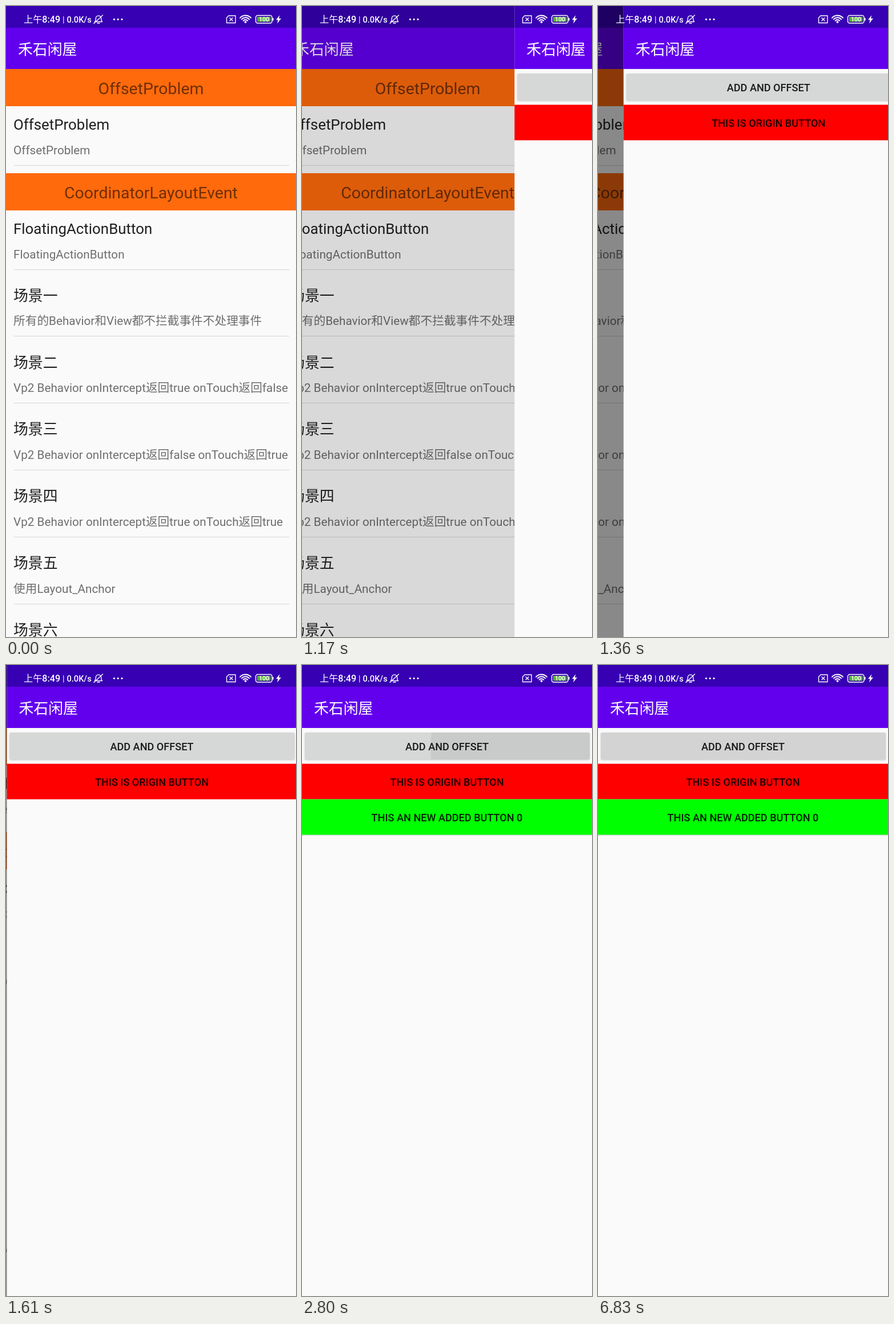
Write an HTML page with a canvas that moves like this. It is 508 px wide and 1102 px high and loops after 8000 ms.

```html
<!DOCTYPE html>
<html lang="zh-CN">
<head>
<meta charset="utf-8">
<title>List to detail</title>
<style>
html, body { margin: 0; width: 100%; height: 100%; overflow: hidden; background: #fafafa; }
canvas { display: block; width: 508px; height: 1102px; }
</style>
</head>
<body>
<canvas id="stage"></canvas>
<script>
const W = 508, H = 1102, LOOP = 8000;
const FAMILY = 'Roboto, "Noto Sans CJK SC", "Noto Sans CJK", sans-serif';
const APP = '禾石闲屋';
const INK = 'rgba(0,0,0,.88)', SOFT = 'rgba(0,0,0,.56)';
const ROW = 116.8, HEAD = 65;

const TICKS = [0, 850, 970, 1070, 1170, 1260, 1360, 1440, 1530, 1610, 1720, 1770,
  1820, 2540, 2630, 2720, 2810, 2900, 2980, 3070];

const ROWS = [
  ['FloatingActionButton', 'FloatingActionButton'],
  ['场景一', '所有的Behavior和View都不拦截事件不处理事件'],
  ['场景二', 'Vp2 Behavior onIntercept返回true onTouch返回false'],
  ['场景三', 'Vp2 Behavior onIntercept返回false onTouch返回true'],
  ['场景四', 'Vp2 Behavior onIntercept返回true onTouch返回true'],
  ['场景五', '使用Layout_Anchor'],
  ['场景六', '']
];

const canvas = document.getElementById('stage');
const dpr = window.devicePixelRatio || 1;
canvas.width = W * dpr;
canvas.height = H * dpr;
const ctx = canvas.getContext('2d');

function rect(x, y, w, h, color) {
  ctx.fillStyle = color;
  ctx.fillRect(x, y, w, h);
}

function text(str, x, y, size, color, weight = 400, align = 'left') {
  ctx.font = `${weight} ${size}px ${FAMILY}`;
  ctx.textAlign = align;
  ctx.fillStyle = color;
  ctx.fillText(str, x, y);
}

function line(points, close) {
  ctx.beginPath();
  points.forEach(([x, y], i) => i ? ctx.lineTo(x, y) : ctx.moveTo(x, y));
  if (close) ctx.closePath();
}

function disc(x, y, r, color) {
  ctx.beginPath();
  ctx.arc(x, y, r, 0, 7);
  ctx.fillStyle = color;
  ctx.fill();
}

function appBar() {
  rect(0, 0, W, 38, '#3700b3');
  rect(0, 38, W, 72, '#6200ee');
  text(APP, 21, 84.5, 25.87, '#fff');
}

function header(y, label) {
  rect(0, y, W, HEAD, '#ff6a0c');
  text(label, W / 2, y + 44, 28.45, SOFT, 400, 'center');
}

function row(y, [title, note]) {
  text(title, 13, y + 41, 25.87, INK);
  text(note, 13, y + 83.5, 20.7, SOFT);
  rect(14, Math.round(y + 102.5), 482, 1, '#d5d5d5');
}

function listPage() {
  rect(0, 0, W, H, '#fafafa');
  header(110, 'OffsetProblem');
  row(175, ['OffsetProblem', 'OffsetProblem']);
  header(292, 'CoordinatorLayoutEvent');
  ROWS.forEach((r, i) => row(357 + i * ROW, r));
  appBar();
}

function caption(str, y) {
  text(str, W / 2, y, 18.1, INK, 500, 'center');
}

function detailPage(t) {
  rect(0, 0, W, H, '#fafafa');
  ctx.save();
  ctx.shadowColor = 'rgba(0,0,0,.22)';
  ctx.shadowBlur = 3 * dpr;
  ctx.shadowOffsetY = dpr;
  ctx.beginPath();
  ctx.roundRect(5, 118, 499, 47, 2.5);
  ctx.fillStyle = t < 3070 ? '#d6d7d7' : '#d3d3d3';
  ctx.fill();
  ctx.restore();

  const press = (t - 2540) / 450;
  if (press > 0 && press < 1) {
    ctx.save();
    ctx.beginPath();
    ctx.roundRect(5, 118, 499, 47, 2.5);
    ctx.clip();
    disc(433, 144, 40 + 420 * press, `rgba(0,0,0,${0.1 * (1 - press)})`);
    ctx.restore();
  }
  caption('ADD AND OFFSET', 148.5);
  rect(0, 172.5, W, 62, '#f00');
  caption('THIS IS ORIGIN BUTTON', 210.5);
  if (t >= 2720) {
    rect(0, 234.5, W, 62, '#0f0');
    rect(0, 296.5, W, 1.5, 'rgba(0,0,0,.12)');
    caption('THIS AN NEW ADDED BUTTON 0', 272.5);
  }
  appBar();
}

function touch(x, y, alpha) {
  ctx.globalAlpha = alpha;
  disc(x, y, 15, '#f1f0f5');
  ctx.lineWidth = 1.5;
  ctx.strokeStyle = '#b9b6d0';
  ctx.stroke();
  ctx.globalAlpha = 1;
}

function bell() {
  ctx.lineWidth = 1.4;
  ctx.beginPath();
  ctx.moveTo(155.5, 27.5);
  ctx.quadraticCurveTo(157.3, 26, 157.3, 22);
  ctx.bezierCurveTo(157.3, 15.5, 166.7, 15.5, 166.7, 22);
  ctx.quadraticCurveTo(166.7, 26, 168.5, 27.5);
  ctx.closePath();
  ctx.stroke();
  line([[160, 30], [164, 30]]);
  ctx.stroke();
  line([[154, 30.5], [169.5, 16]]);
  ctx.stroke();
}

function wifi() {
  ctx.lineWidth = 2;
  for (const r of [5, 8.8, 12.6]) {
    ctx.beginPath();
    ctx.arc(419.5, 29, r, -Math.PI * 0.77, -Math.PI * 0.23);
    ctx.stroke();
  }
  disc(419.5, 28, 1.9, '#fff');
}

function statusBar() {
  ctx.strokeStyle = '#fff';
  ctx.lineCap = ctx.lineJoin = 'round';
  text('上午8:49', 31, 29, 16.2, '#fff', 500);
  text('|', 99, 28.5, 14.5, '#fff');
  text('0.0K/s', 106.5, 29, 14.6, '#fff', 500);
  bell();
  for (const x of [189.5, 196.2, 203]) disc(x, 23.3, 1.6, '#fff');

  ctx.lineWidth = 1.4;
  line([[390, 17], [402, 17], [402, 29.5], [386.5, 29.5], [386.5, 20.5]], true);
  ctx.stroke();
  line([[392, 20.8], [397, 25.8]]);
  ctx.stroke();
  line([[397, 20.8], [392, 25.8]]);
  ctx.stroke();
  wifi();

  ctx.lineWidth = 1.5;
  ctx.beginPath();
  ctx.roundRect(437.5, 16.5, 28.5, 13.5, 3.5);
  ctx.stroke();
  rect(440, 19, 23.5, 8.5, '#50b52f');
  rect(467, 21, 1.6, 4.5, '#fff');
  text('100', 452, 27.2, 10.5, '#fff', 700, 'center');

  line([[479.5, 16], [473, 24.3], [476.5, 24.3], [475, 30.5], [482, 21.7], [478, 21.7]], true);
  ctx.fillStyle = '#fff';
  ctx.fill();
}

// Critically damped spring: 1 is off screen, 0 is settled.
function slide(t) {
  if (t < 1107) return 1;
  if (t >= 1820) return 0;
  const k = 0.016 * (t - 1107);
  return (1 + k) * Math.exp(-k);
}

function draw(t) {
  const left = slide(t), done = 1 - left;
  ctx.setTransform(dpr, 0, 0, dpr, 0, 0);

  if (left > 0) {
    ctx.save();
    ctx.translate(-done * W / 4, 0);
    listPage();
    ctx.restore();
    // cover the strip uncovered by the parallax and dim the list
    rect(0, 0, W, H, `rgba(0,0,0,${done / 2})`);
  }
  if (left < 1) {
    ctx.save();
    ctx.translate(left * W, 0);
    detailPage(t);
    ctx.restore();
  }
  statusBar();

  if (t >= 850 && t < 1070) touch(397, 221, 1);
  else if (t >= 1070 && t < 1170) touch(397, 221, 0.15);
  if (t >= 2540 && t < 2720) touch(433, 144, 1);
}

const start = performance.now();
function frame(now) {
  const t = Math.max(0, now - start) % LOOP;
  draw(TICKS.filter(k => k <= t).pop());
  requestAnimationFrame(frame);
}
draw(0);
requestAnimationFrame(frame);
</script>
</body>
</html>
```
